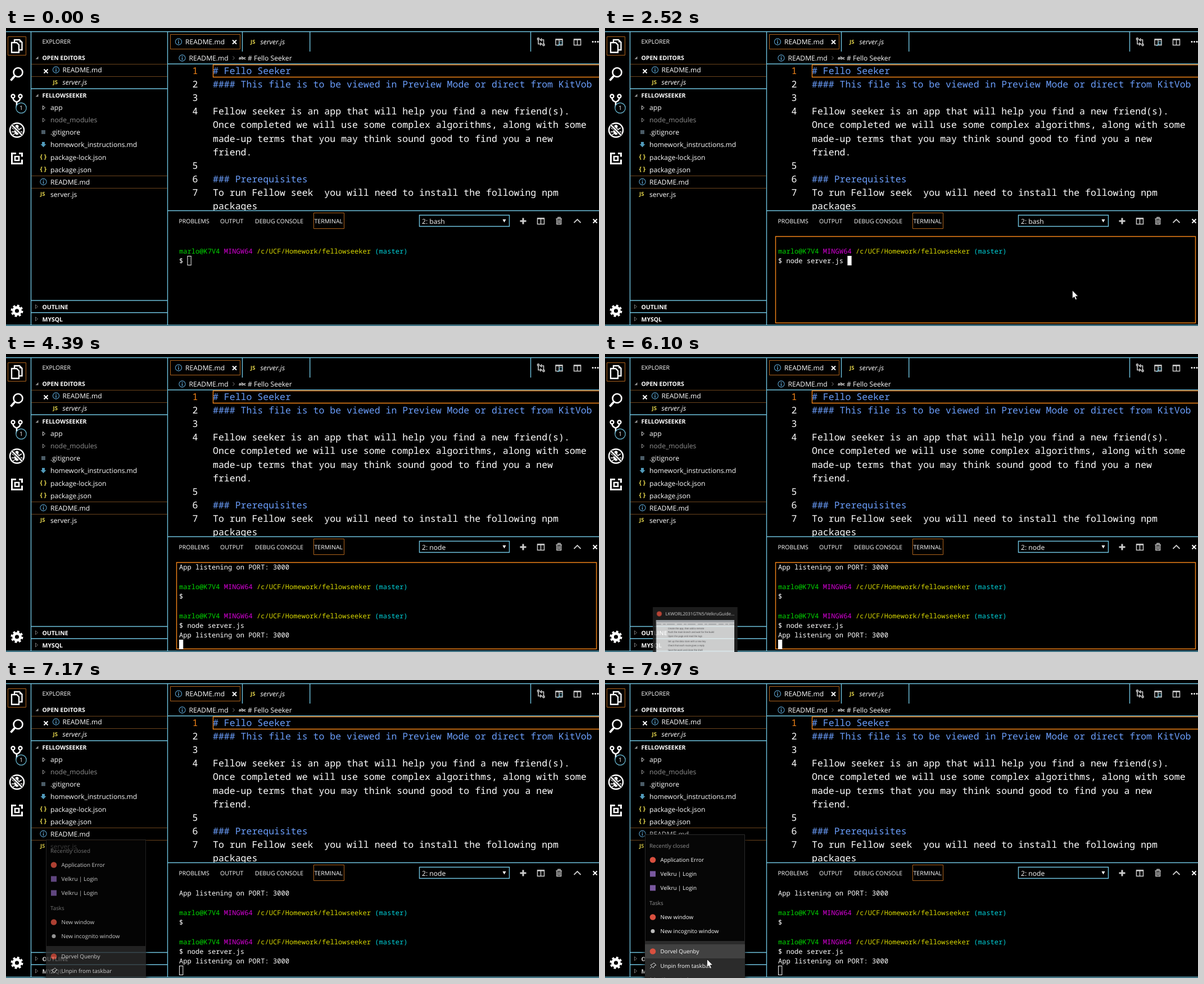
Recreate the animation shown at these times as an HTML page. Size 1055 px wide and 531 px high, loop 8000 ms.

```html
<!DOCTYPE html>
<html lang="en">
<head>
<meta charset="utf-8">
<title>Editor and terminal</title>
<style>
html, body { margin: 0; width: 100%; height: 100%; overflow: hidden; background: #000; }
svg { display: block; width: 100vw; height: 100vh; }
text { fill: #fff; white-space: pre; text-rendering: geometricPrecision; font: 12.1px "Open Sans", "Noto Sans", sans-serif; }
.caps text, text.caps { font-size: 10.5px; }
.bold text, text.bold { font-weight: 700; }
.it { font-style: italic; }
text.js { font-size: 9.5px; font-weight: 700; fill: #e3d44b; }
text.json { font-size: 11px; }
.code text { font: 500 16.54px "Noto Sans Mono", "DejaVu Sans Mono", monospace; }
.code .head { fill: #6a9dfa; }
.code .current { fill: #f38518; }
text.sh { font: 500 12.1px "Noto Sans Mono", "DejaVu Sans Mono", monospace; }
.user { fill: #00d800; } .sys { fill: #d800d8; } .path { fill: #d8d800; } .branch { fill: #00d0d8; }
.menu text { font-size: 9.9px; }
.menu .dim, .dim { fill: #909090; }
.tiny text { font-size: 4px; fill: #444; }
.line { fill: none; stroke: #6fc3df; stroke-width: 1.4; }
.focus { fill: none; stroke: #f38518; stroke-width: 1.4; }
.soft { stroke: #b0641c; stroke-width: 1; }
.faint { stroke: #6b431c; stroke-width: 1; }
.icon { fill: none; stroke: #fff; }
.solid { fill: #fff; stroke: none; }

/* 1% of the loop is 80 ms */
.pointer, .hover, .cursor, .active, .before, .after, .typed, .bash, .node, .preview, .menu {
  animation: 8s step-end infinite;
}
.pointer { animation-name: pointer; }
@keyframes pointer {
  0%, 54.875% { transform: translate(-50px, -50px); }
  2.625% { transform: translate(909px, 518px); }
  3.5% { transform: translate(891px, 505px); }
  4.5% { transform: translate(874px, 492px); }
  5.375% { transform: translate(863px, 484px); }
  6.25% { transform: translate(857px, 481px); }
  25.625% { transform: translate(852px, 478px); }
  26.625% { transform: translate(843px, 472px); }
  27.625% { transform: translate(834px, 468px); }
  28.625% { transform: translate(831px, 467px); }
  52.875% { transform: translate(812px, 486px); }
  53.875% { transform: translate(764px, 521px); }
  94.75% { transform: translate(158px, 511px); }
  95.625% { transform: translate(156px, 447px); }
  96.625% { transform: translate(157px, 420px); }
  98.75% { transform: translate(172px, 455px); }
  99.625%, 100% { transform: translate(181px, 497px); }
}
.hover { animation-name: hover; }
@keyframes hover {
  0% { transform: translateY(600px); }
  94.75% { transform: translateY(496px); }
  95.625%, 98.75% { transform: translateY(435px); }
  96.625% { transform: translateY(410px); }
  99.625%, 100% { transform: translateY(471px); }
}
.cursor { animation-name: cursor; }
@keyframes cursor {
  0% { transform: translate(322.5px, 406px); fill: #000; }
  28.625% { transform: translate(322.5px, 406px); fill: #fff; }
  31.5% { transform: translate(431.4px, 406px); fill: #fff; }
  47% { transform: translate(308px, 423px); fill: #fff; }
  51.125% { transform: translate(308px, 509px); fill: #fff; }
  79.125%, 100% { transform: translate(308px, 509px); fill: #000; }
}
.active { animation-name: active; }
@keyframes active { 0%, 79.125%, 100% { opacity: 0; } 28.625% { opacity: 1; } }
.before { animation-name: before; }
@keyframes before { 0% { opacity: 1; } 51.125%, 100% { opacity: 0; } }
.after { animation-name: after; }
@keyframes after { 0% { opacity: 0; } 51.125%, 100% { opacity: 1; } }
.typed { animation-name: typed; }
@keyframes typed { 0% { opacity: 0; } 31.5%, 100% { opacity: 1; } }
.bash { animation-name: bash; }
@keyframes bash { 0% { opacity: 1; } 48.125%, 100% { opacity: 0; } }
.node { animation-name: node; }
@keyframes node { 0% { opacity: 0; } 48.125%, 100% { opacity: 1; } }
.preview { animation-name: preview; transform-origin: 160.5px 451px; }
@keyframes preview {
  0%, 84.25%, 100% { opacity: 0; transform: none; }
  76.25% { opacity: .85; transform: none; }
  77.25% { opacity: .95; transform: translateY(-2px) scale(1.06); }
  78.25% { opacity: 1; transform: translateY(-3px) scale(1.09); }
  82.5% { opacity: .5; transform: translateY(2px) scale(1.03); }
}
.menu { animation-name: menu; filter: drop-shadow(0 0 4px #000); }
@keyframes menu {
  0% { opacity: 0; transform: translateY(30px); }
  88.625% { opacity: .45; transform: translateY(24px); }
  89.5% { opacity: .8; transform: translateY(9px); }
  90.375% { opacity: .95; transform: translateY(3px); }
  91.125%, 100% { opacity: 1; transform: none; }
}
</style>
</head>
<body>
<svg viewBox="0 0 1055 531" preserveAspectRatio="none">
<defs>
  <g id="info" fill="none" stroke="#5aa0cc"><circle r="5.6" stroke-width="1.1"/><path d="M0-1V3.4M0-3.4V-2" stroke-width="1.5"/></g>
  <path id="closed" d="M-2-3.5 2 0-2 3.5z" fill="none"/>
  <path id="open" d="M2.5-2.5v5h-5z" fill="#999"/>
  <path id="cross" d="M-3.5-3.5l7 7M3.5-3.5l-7 7" fill="none" stroke="#fff" stroke-width="1.9"/>
  <g id="split" fill="none" stroke="#ccc" stroke-width="1.5"><path d="M-6-5H6V5.5H-6zM0-5V5.5"/><path d="M-6-4.5H6" stroke-width="2.5"/></g>
  <text id="prompt" class="sh"><tspan class="user">marlo@K7V4</tspan> <tspan class="sys">MINGW64</tspan> <tspan class="path">/c/UCF/Homework/fellowseeker</tspan> <tspan class="branch">(master)</tspan></text>
  <clipPath id="editor"><path d="M288 64h767v261H288z"/></clipPath>
</defs>
<rect width="1055" height="531"/>

<!-- activity bar -->
<path class="focus soft" d="M3.5 15.5h32v33h-32z"/>
<g class="icon" stroke-width="2.3">
  <path d="M15 25V21h9l4.500 4.500V39H24M10 26h9l4 4v13.500H10z"/><path d="M24 20.500v5h5z" class="solid"/>
  <circle cx="21.5" cy="79" r="8" stroke-width="2.6"/><path d="M16 85l-7.500 8.500" stroke-width="3.8"/>
  <circle cx="12.5" cy="121.5" r="3"/><circle cx="25.5" cy="121.5" r="3"/><path d="M12.5 124.5q0 5 6.5 7.5 6.5-2.5 6.5-7.5M19 132v10" stroke-width="2.6"/>
  <circle cx="19.5" cy="182" r="12.5" stroke-width="2.5"/>
  <ellipse cx="19.5" cy="184" rx="4.5" ry="6.5" class="solid"/><circle cx="19.5" cy="175.5" r="3" class="solid"/>
  <path d="M11 178l5 3M28 178l-5 3M10 185h19M12 191l4-3M27 191l-4-3" stroke-width="1.5"/>
  <path d="M10.5 173l18 18" stroke="#000" stroke-width="5"/><path d="M10.5 173l18 18" stroke-width="2.5"/>
  <path d="M18 223.5h-7.500v18h18v-7M23 223.500h5.500v6" stroke-width="3"/><path d="M16 229h7v7h-7z" stroke-width="2.6"/>
  <circle cx="19.5" cy="504" r="6" stroke-width="4.8"/><circle cx="19.5" cy="504" r="9.2" stroke-width="3.6" stroke-dasharray="3.8 3.425"/>
</g>
<circle cx="27" cy="142.5" r="9.2" fill="#000" stroke="#6fc3df" stroke-width="1.2"/>
<text x="24" y="146.3" class="caps">1</text>

<!-- explorer -->
<path class="line" d="M44.5 6.5v523M287.5 6.5v523M44 108.2h243M44 485.5h243M44 507.3h243"/>
<path class="focus faint" d="M45 64.5h242M45 86.5h242M45 263.5h242M45 285.5h242"/>
<text x="64.5" y="28.3" class="caps">EXPLORER</text>
<use href="#open" x="55" y="53"/><use href="#open" x="55" y="120"/>
<g class="caps bold">
  <text x="64.5" y="57">OPEN EDITORS</text><text x="64.5" y="124.3">FELLOWSEEKER</text>
  <text x="64.5" y="500.5">OUTLINE</text><text x="64.5" y="522.7">MYSQL</text>
</g>
<use href="#cross" x="71" y="77"/>
<use href="#info" x="89" y="74.5"/><text x="100.5" y="79.3">README.md</text>
<text x="83.5" y="100.3" class="js">JS</text><text x="100.5" y="101.3" class="it">server.js</text>
<g stroke="#ddd"><use href="#closed" x="67.5" y="142"/><use href="#closed" x="67.5" y="164" stroke="#999"/></g>
<g stroke="#777"><use href="#closed" x="54.5" y="496.5"/><use href="#closed" x="54.5" y="518.5"/></g>
<text x="79" y="146.3">app</text>
<text x="79" y="168.3" class="dim">node_modules</text>
<rect x="63" y="182" width="7" height="7" fill="#4a5b66"/><text x="79" y="190.3">.gitignore</text>
<path d="M64 203h5v4h2.500l-5 5.500-5-5.500H64z" fill="#519aba"/><text x="79" y="212.3">homework_instructions.md</text>
<text x="60.5" y="233.3" class="js json">{ }</text><text x="79" y="234.5">package-lock.json</text>
<text x="60.5" y="255.3" class="js json">{ }</text><text x="79" y="256.5">package.json</text>
<use href="#info" x="66.5" y="274"/><text x="79" y="278.6">README.md</text>
<text x="61" y="299.3" class="js">JS</text><text x="79" y="300.6">server.js</text>

<!-- editor tabs -->
<path class="line" d="M0 6.5h1055M0 529.5h1055M420.5 7v35M540.7 7v35M933.5 7v35M288 64h767M288 325.5h767"/>
<path class="focus soft" d="M292.5 11.5h124v26h-124z"/>
<use href="#info" x="307" y="24.5"/><text x="319" y="29.3">README.md</text><use href="#cross" x="406.5" y="25"/>
<text x="435" y="28.3" class="js">JS</text><text x="452.5" y="29.3" class="it">server.js</text>
<use href="#info" x="313.5" y="53.5"/><text x="325.5" y="57.8">README.md</text>
<path d="M403.5 50.5l3 3-3 3" fill="none" stroke="#888"/>
<text x="414" y="56" class="bold" style="font-size:7.3px">abc</text><text x="430" y="57.8"># Fello Seeker</text>
<g fill="none" stroke="#ccc" stroke-width="1.6">
  <path d="M947 21v7.500h5M956.500 29v-8h-5"/><circle cx="947" cy="19.5" r="1.6"/><circle cx="956.5" cy="30" r="1.6"/>
  <path d="M950 26l3 2.500-3 2.500M953.500 18.500l-3 2.500 3 2.500"/>
</g>
<use href="#split" x="984" y="25"/><circle cx="987" cy="26.5" r="2.5" fill="#000" stroke="#6fc3df"/><path d="M985 28.5l-3.5 3.5" stroke="#6fc3df" stroke-width="1.5"/>
<use href="#split" x="1016.5" y="25"/>
<g class="solid"><circle cx="1044" cy="24.5" r="1.5"/><circle cx="1048.5" cy="24.5" r="1.5"/><circle cx="1053" cy="24.5" r="1.5"/></g>

<!-- document -->
<path class="focus" d="M1060 65.5H368.5v22H1060"/>
<g class="code" clip-path="url(#editor)">
  <g text-anchor="end">
    <text x="341.5" y="82" class="current">1</text><text x="341.5" y="106.1">2</text><text x="341.5" y="130.2">3</text>
    <text x="341.5" y="154.3">4</text><text x="341.5" y="250.7">5</text><text x="341.5" y="274.8">6</text><text x="341.5" y="298.9">7</text>
  </g>
  <text class="head" x="368" y="82"># Fello Seeker</text>
  <text class="head" x="368" y="106.1">#### This file is to be viewed in Preview Mode or direct from KitVob</text>
  <text x="368" y="154.3">Fellow seeker is an app that will help you find a new friend(s).</text>
  <text x="368" y="178.4">Once completed we will use some complex algorithms, along with some</text>
  <text x="368" y="202.5">made-up terms that you may think sound good to find you a new</text>
  <text x="368" y="226.6">friend.</text>
  <text class="head" x="368" y="274.8">### Prerequisites</text>
  <text x="368" y="298.9">To run Fellow seek  you will need to install the following npm</text>
  <text x="368" y="323">packages</text>
</g>

<!-- panel -->
<g class="caps">
  <text x="307.5" y="348">PROBLEMS</text><text x="381" y="348">OUTPUT</text><text x="443" y="348">DEBUG CONSOLE</text><text x="548.5" y="348">TERMINAL</text>
</g>
<path class="focus soft" d="M547.5 329.5h54v28h-54z"/>
<path class="line" d="M735.5 333.5h160v20h-160z"/>
<text x="740" y="348.7" class="bash">2: bash</text><text x="740" y="348.7" class="node">2: node</text>
<path d="M883.5 341h6l-3 5.500z" class="solid"/>
<path d="M914.5 344h11M920 338.500v11" stroke="#ccc" stroke-width="3"/>
<use href="#split" x="951.5" y="344"/>
<g fill="none" stroke="#ccc" stroke-width="1.5"><path d="M978.5 340h10.500M982 339v-1.500h4V339M980 341v8.500h7.500V341M982.500 342v6M985 342v6"/><path d="M1010.5 347l6-6 6 6" stroke-width="1.8"/></g>
<use href="#cross" x="1048" y="344"/>

<!-- terminal -->
<path class="focus active" d="M303.5 371.5h747v154h-747z"/>
<g class="before">
  <use href="#prompt" x="308" y="401.6"/>
  <text x="308" y="418.8" class="sh">$</text>
  <text x="322.5" y="418.8" class="sh typed">node server.js</text>
</g>
<g class="after">
  <text x="308" y="384.3" class="sh">App listening on PORT: 3000</text>
  <use href="#prompt" x="308" y="418.8"/>
  <text x="308" y="436" class="sh">$</text>
  <use href="#prompt" x="308" y="470.5"/>
  <text x="308" y="487.8" class="sh">$ node server.js</text>
  <text x="308" y="505" class="sh">App listening on PORT: 3000</text>
</g>
<rect class="cursor" x=".5" y=".5" width="6.3" height="16" stroke="#fff"/>

<!-- window preview -->
<g class="preview">
  <path d="M85 451h151v90H85z" fill="#222"/>
  <circle cx="96.5" cy="463" r="4.5" fill="#d9503f"/>
  <text x="107.5" y="466" style="font-size:7.8px">LKWORL2031GTN5/VelkruGuide...</text>
  <path d="M91 474h139v67H91z" fill="#f1f2f3"/>
  <path d="M91 474h139v4H91z" fill="#b4b9be"/>
  <path d="M91 481.5h139" stroke="#8c9196" stroke-dasharray="9 3 5 2 14 4"/>
  <g class="tiny">
    <text x="112" y="490">Create the app, then add a remote</text>
    <text x="112" y="497">Push the main branch and wait for the build</text>
    <text x="112" y="504">Open the page and read the logs</text>
    <text x="112" y="513">Set up the data store with a new key</text>
    <text x="112" y="521">Check that each route gives a reply</text>
    <text x="112" y="529">Save the work and close the shell</text>
  </g>
</g>

<!-- taskbar menu -->
<g class="menu">
  <path d="M71 275h178v300H71z" fill="#060606"/>
  <path d="M71 465h178v110H71z" fill="#2b2b2b"/>
  <path d="M71.5 580V275.5h177V580" fill="none" stroke="#2a2a2a"/>
  <rect class="hover" x="71" width="178" height="25" fill="#414141"/>
  <text class="dim" x="79" y="298.7">Recently closed</text>
  <text class="dim" x="79" y="401">Tasks</text>
  <g fill="#d9503f"><circle cx="85" cy="320.5" r="5.3"/><circle cx="85" cy="422.5" r="5.3"/><circle cx="85" cy="483.5" r="5.3"/></g>
  <path d="M80 340.5h10v10H80zM80 365.5h10v10H80z" fill="#79589f"/>
  <circle cx="85" cy="447.5" r="3.5" fill="#bbb"/>
  <path d="M87 504l4 4-3 1-2 4-5-5 4-2zM83.5 510.5l-3.5 3.5" fill="none" stroke="#ddd"/>
  <path d="M81.5 530.5l7 7M88.5 530.5l-7 7" stroke="#ddd"/>
  <text x="98.5" y="324">Application Error</text>
  <text x="98.5" y="349.2">Velkru | Login</text>
  <text x="98.5" y="374.3">Velkru | Login</text>
  <text x="98.5" y="426">New window</text>
  <text x="98.5" y="451.2">New incognito window</text>
  <text x="98.5" y="487.3">Dorvel Quenby</text>
  <text x="98.5" y="512.5">Unpin from taskbar</text>
  <text x="98.5" y="537.7">Close window</text>
</g>

<path class="pointer" d="M.5.5V15l3.300-3.100 2.300 5.300 2.400-1-2.300-5.200h4.500z" fill="#fff" stroke="#000" stroke-width=".7"/>
</svg>
</body>
</html>
```
